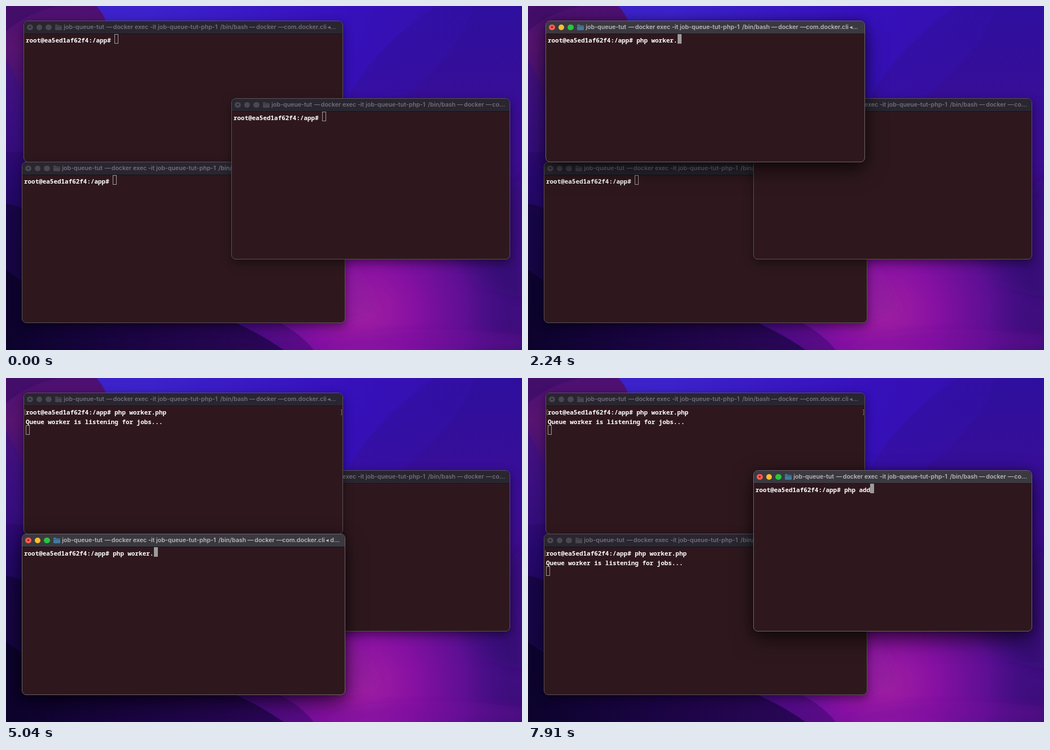
Animation, 914 px wide and 612 px high, one loop 8000 ms. Source, as an HTML page:

```html
<!DOCTYPE html>
<html lang="en">
<head>
<meta charset="utf-8">
<title>Terminals</title>
<style>
html, body { margin: 0; width: 100%; height: 100%; overflow: hidden; background: #25086a; }
#stage { position: relative; width: 914px; height: 612px; overflow: hidden; }
#wall { position: absolute; inset: 0; }
.win {
  position: absolute; box-sizing: border-box; overflow: visible;
  border: 1px solid #5d5059; border-radius: 8px; background: #2e181e;
  box-shadow: 0 6px 18px rgba(0,0,0,.45);
}
.win.on { border-color: #6e6268; box-shadow: 0 14px 36px rgba(0,0,0,.62), 0 0 14px rgba(0,0,0,.3); }
.bar {
  position: absolute; left: 0; right: 0; top: 0; height: 22px; overflow: hidden;
  border-radius: 7px 7px 0 0; background: #292630; border-bottom: 1px solid #17121a;
  color: #736e79; font: 600 10.6px/22px Inter, "DejaVu Sans", sans-serif;
}
.on .bar { background: #3b3940; color: #bab7bc; }
.bar span { position: absolute; top: -.5px; white-space: pre; }
.dot { position: absolute; top: 5.5px; width: 10.6px; height: 10.6px; border-radius: 50%; background: #4b4751; }
.dot.edited::after {
  content: ""; position: absolute; left: 3.6px; top: 3.6px; width: 3.4px; height: 3.4px;
  border-radius: 50%; background: #211e26;
}
.on .dot { background: var(--c); }
.on .dot.edited::after { background: #7c0d0a; }
.folder { position: absolute; left: 55px; top: 6px; width: 12px; height: 10px; color: #49454f; }
.on .folder { color: #417b9e; }
.line {
  position: absolute; left: 3px; white-space: pre; color: #fff;
  font: 700 10.93px/17px "Noto Sans Mono", "Liberation Mono", monospace;
  font-variant-ligatures: none;
}
.cursor {
  position: absolute; box-sizing: border-box; width: 7px; height: 17px;
  border: 1px solid #a39a9e;
}
.on .cursor { background: #9d9a9c; border-color: #9d9a9c; }
.mark { position: absolute; top: 28.5px; width: 2px; height: 10px; box-sizing: border-box; border: 1px solid #77686e; }
.mark.l { left: 1px; border-right: 0; }
.mark.r { right: 1px; border-left: 0; }
</style>
</head>
<body>
<div id="stage">
<svg id="wall" width="914" height="612" viewBox="0 0 914 612">
  <defs>
    <linearGradient id="sky" x1="0" y1="0" x2="1" y2=".35">
      <stop offset="0" stop-color="#3a22c4"/>
      <stop offset=".25" stop-color="#3c22cc"/>
      <stop offset=".6" stop-color="#3610bb"/>
      <stop offset="1" stop-color="#33109a"/>
    </linearGradient>
    <linearGradient id="left" x1="0" y1="0" x2="0" y2="1">
      <stop offset="0" stop-color="#4c1072"/>
      <stop offset=".12" stop-color="#571470"/>
      <stop offset=".3" stop-color="#3c0f78"/>
      <stop offset=".5" stop-color="#26086c"/>
      <stop offset=".75" stop-color="#19054c"/>
      <stop offset="1" stop-color="#0d0330"/>
    </linearGradient>
    <linearGradient id="right" x1="0" y1="0" x2="0" y2="1">
      <stop offset="0" stop-color="#2e0f9e"/>
      <stop offset=".45" stop-color="#3d0d93"/>
      <stop offset=".75" stop-color="#430e86"/>
      <stop offset="1" stop-color="#3c0d78"/>
    </linearGradient>
    <linearGradient id="floor" x1="0" y1="0" x2="1" y2="0">
      <stop offset="0" stop-color="#0c032c"/>
      <stop offset=".45" stop-color="#1a0442"/>
      <stop offset="1" stop-color="#2b0658"/>
    </linearGradient>
    <radialGradient id="glow" gradientUnits="userSpaceOnUse" cx="635" cy="545" r="260">
      <stop offset="0" stop-color="#a01fa2"/>
      <stop offset=".35" stop-color="#8610a2"/>
      <stop offset=".7" stop-color="#620f96" stop-opacity=".85"/>
      <stop offset="1" stop-color="#430e86" stop-opacity="0"/>
    </radialGradient>
    <filter id="soft" x="-20%" y="-20%" width="140%" height="140%"><feGaussianBlur stdDeviation="9"/></filter>
  </defs>
  <rect width="914" height="612" fill="url(#sky)"/>
  <path d="M760 0Q660 70 612 150L560 330V612H914V0Z" fill="url(#right)" opacity=".55"/>
  <path d="M830 0Q800 85 700 165L640 400V612H914V0Z" fill="url(#right)"/>
  <path d="M914 290Q850 400 740 470L914 520Z" fill="#2f0a6c" opacity=".55" filter="url(#soft)"/>
  <path d="M0 0H160Q172 12 178 30L300 300V612H0Z" fill="url(#left)"/>
  <path d="M0 0H95Q40 10 0 45Z" fill="#3e0d66" opacity=".7"/>
  <path d="M0 95Q22 130 40 190V260H0Z" fill="#3a1184" opacity=".5"/>
  <path d="M0 352Q30 356 60 380V480H0Z" fill="#15053f" opacity=".8"/>
  <path d="M380 440H914V612H380Z" fill="url(#glow)"/>
  <path d="M0 470Q60 510 120 540L395 558Q450 582 492 612H0Z" fill="url(#floor)"/>
  <path d="M395 556Q450 582 492 612H545Q520 580 470 556Z" fill="#4b0878" opacity=".65"/>
  <path d="M545 612Q640 555 914 585V612Z" fill="#790f9e" opacity=".35" filter="url(#soft)"/>
  <path d="M600 450Q640 490 660 545L600 560Z" fill="#8a1c9c" opacity=".5" filter="url(#soft)"/>
</svg>
</div>
<script>
const LOOP = 8000, CELL = 6.56, ROW = 17;
const PROMPT = 'root@ea5ed1af62f4:/app# ';
const OUTPUT = 'Queue worker is listening for jobs...';

// title pieces by distance from the title's start
const HEAD = [[0, 'job-queue-tut'], [75.5, '—'], [87.5, 'docker exec -it job-queue-tut-php-1'],
  [277, '/bin/bash'], [328.5, '—'], [341, 'docker'], [379.5, '—']];

// keys: time of each typed character; enter and out: start of the command and its output
const WINDOWS = [
  { box: [31, 26, 566, 252], tail: [[390, 'com.docker.cli'], [467, '◂...']],
    cmd: 'php worker.php', enter: 2870, out: 3080,
    keys: [1260, 1400, 1470, 1540, 1680, 1820, 1890, 1960, 2100, 2240, 2240, 2520, 2660, 2730] },
  { box: [28, 277, 573, 287], tail: [[390, 'com.docker.cli'], [467, '◂ d...']],
    cmd: 'php worker.php', enter: 5600, out: 5880,
    keys: [4060, 4200, 4340, 4410, 4550, 4620, 4690, 4760, 4830, 4900, 5040, 5250, 5390, 5460] },
  { box: [399, 164, 494, 287], tail: [[391, 'co...']],
    cmd: 'php add', enter: Infinity, out: Infinity,
    keys: [7140, 7280, 7350, 7490, 7630, 7770, 7910] }
];

// stacking order from back to front, and the focused window
const FOCUS = [
  { at: 0, order: [0, 1, 2], active: -1 },
  { at: 560, order: [1, 2, 0], active: 0 },
  { at: 3570, order: [2, 0, 1], active: 1 },
  { at: 6580, order: [0, 1, 2], active: 2 }
];

const stage = document.getElementById('stage');

function add(parent, cls, tag = 'div') {
  const el = document.createElement(tag);
  el.className = cls;
  return parent.appendChild(el);
}

function build(w) {
  const [x, y, width, height] = w.box;
  w.el = add(stage, 'win');
  w.el.style.cssText = `left:${x}px;top:${y}px;width:${width}px;height:${height}px`;
  const bar = add(w.el, 'bar');
  ['#fe5b52', '#febc2e', '#29c53f'].forEach((color, i) => {
    const dot = add(bar, i ? 'dot' : 'dot edited');
    dot.style.left = 5.4 + i * 16.4 + 'px';
    dot.style.setProperty('--c', color);
  });
  bar.insertAdjacentHTML('beforeend',
    '<svg class="folder" viewBox="0 0 12 10"><path fill="currentColor" d="M0 1.2Q0 0 1.2 0H4L5.2 1.4H10.8Q12 1.4 12 2.6V8.8Q12 10 10.8 10H1.2Q0 10 0 8.8Z"/><path d="M0 3.2H12" stroke="#0006" stroke-width=".7"/></svg>');
  for (const [dx, text] of [...HEAD, ...w.tail]) {
    const part = add(bar, '', 'span');
    part.style.left = 70.3 + dx + 'px';
    part.textContent = text;
  }
  w.lines = [0, 1].map(row => {
    const line = add(w.el, 'line');
    line.style.top = 25.2 + row * ROW + 'px';
    return line;
  });
  w.marks = [add(w.el, 'mark l'), add(w.el, 'mark r')];
  w.cursor = add(w.el, 'cursor');
}

function setText(el, text) {
  if (el.textContent !== text) el.textContent = text;
}

function render(t) {
  const focus = FOCUS.filter(f => f.at <= t).pop();
  WINDOWS.forEach((w, i) => {
    const typed = w.keys.filter(k => k <= t).length;
    const ran = t >= w.enter, done = t >= w.out;
    w.el.style.zIndex = 1 + focus.order.indexOf(i);
    w.el.classList.toggle('on', focus.active === i);
    setText(w.lines[0], PROMPT + w.cmd.slice(0, typed));
    setText(w.lines[1], done ? OUTPUT : '');
    for (const m of w.marks) m.style.display = ran ? '' : 'none';
    const row = done ? 2 : ran ? 1 : 0;
    const col = ran ? 0 : PROMPT.length + typed;
    w.cursor.style.left = 3 + col * CELL + 'px';
    w.cursor.style.top = 23 + row * ROW + 'px';
  });
}

WINDOWS.forEach(build);
const start = performance.now();
function tick() {
  render((performance.now() - start) % LOOP);
  requestAnimationFrame(tick);
}
tick();
</script>
</body>
</html>
```
